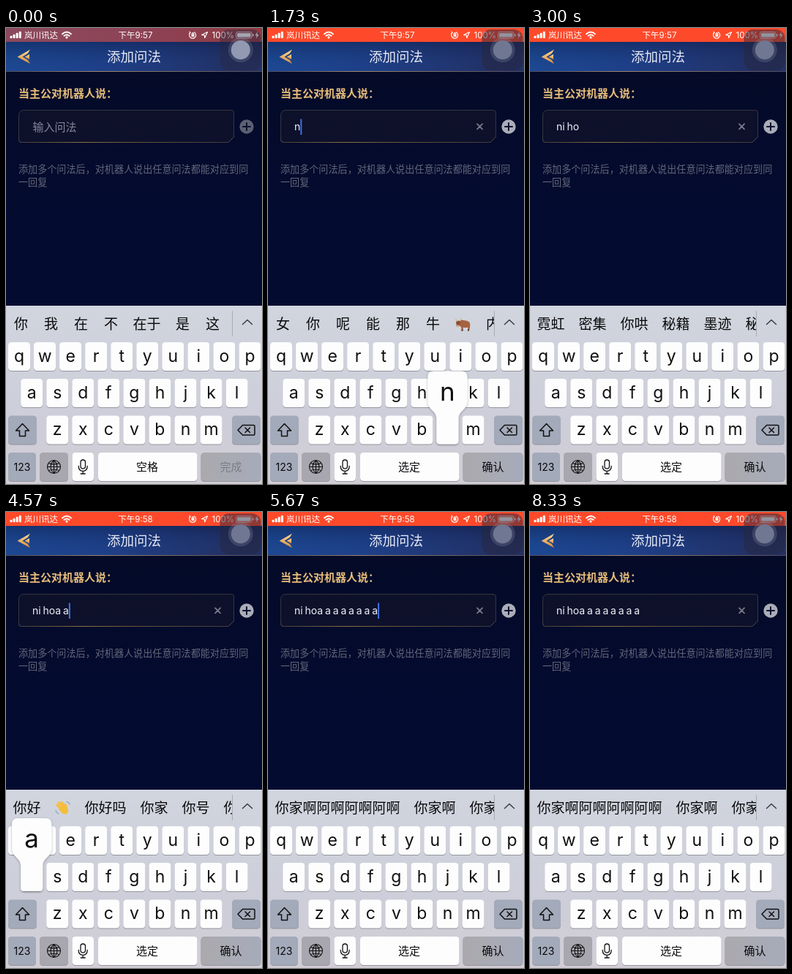
Write an HTML page that moves like this. It is 350x624 px and loops after 8.36 s.

```html
<!DOCTYPE html>
<html lang="zh-CN">
<head>
<meta charset="utf-8">
<title>添加问法</title>
<style>
html, body { margin: 0; width: 100%; height: 100%; overflow: hidden; background: #030b2c; }
svg { display: block; width: 100vw; height: 100vh; }
text { font-family: Inter, "Noto Sans CJK SC", "Noto Sans CJK", sans-serif; white-space: pre; }
.mid { text-anchor: middle; }
.letter { font-size: 23px; font-weight: 400; fill: #101010; }
.line { fill: none; stroke-linecap: round; stroke-linejoin: round; }
</style>
</head>
<body>
<svg id="stage" viewBox="0 0 350 624">
  <defs>
    <linearGradient id="nav" x2="1" y2=".15">
      <stop stop-color="#1a4a94"/><stop offset=".5" stop-color="#1d3d85"/><stop offset="1" stop-color="#222c5c"/>
    </linearGradient>
    <linearGradient id="navShade" x2="0" y2="1">
      <stop stop-color="#0a1740" stop-opacity=".4"/><stop offset="1" stop-color="#2a55a8" stop-opacity=".12"/>
    </linearGradient>
    <linearGradient id="rule">
      <stop stop-color="#4d4a5c"/><stop offset=".35" stop-color="#a08868"/><stop offset="1" stop-color="#4d4a5c"/>
    </linearGradient>
    <linearGradient id="page" x2="0" y2="1">
      <stop stop-color="#040a25"/><stop offset=".45" stop-color="#030b31"/><stop offset="1" stop-color="#030a2d"/>
    </linearGradient>
    <linearGradient id="gold" x2="0" y2="1">
      <stop stop-color="#ffdc96"/><stop offset="1" stop-color="#d78a3c"/>
    </linearGradient>
    <linearGradient id="edge" gradientUnits="userSpaceOnUse" x1="17" x2="311" y1="0" y2="0">
      <stop stop-color="#423d3d"/><stop offset=".3" stop-color="#8a6f44"/><stop offset=".55" stop-color="#66553c"/><stop offset="1" stop-color="#3e3b40"/>
    </linearGradient>
    <linearGradient id="board" x2="0" y2="1">
      <stop stop-color="#d1d5de"/><stop offset=".6" stop-color="#cdced9"/><stop offset="1" stop-color="#d2cdd5"/>
    </linearGradient>
    <linearGradient id="action">
      <stop stop-color="#aba9ad"/><stop offset="1" stop-color="#a6abba"/>
    </linearGradient>
    <clipPath id="candClip"><rect y="382" width="309" height="44"/></clipPath>
    <filter id="soft" x="-30%" y="-30%" width="160%" height="160%">
      <feDropShadow dx="0" dy="1" stdDeviation="1.4" flood-color="#333" flood-opacity=".4"/>
    </filter>
  </defs>

  <rect width="350" height="624" fill="url(#page)"/>

  <rect width="350" height="60" fill="url(#nav)"/>
  <rect y="19" width="350" height="41" fill="url(#navShade)"/>
  <rect y="59" width="350" height="1" fill="url(#rule)"/>
  <path d="M33 29.5L15.5 39.5L33 49L29.8 43.8L22.5 39.5L29.8 34.7Z" fill="url(#gold)"/>
  <path d="M25.5 39.5L32 36V43Z" fill="url(#gold)"/>
  <text class="mid" x="175" y="45.5" font-size="18.5" fill="#e6eaf5">添加问法</text>

  <rect id="bar" width="350" height="19" fill="#fe4a2b"/>
  <g id="status" fill="#fff"></g>

  <g>
    <rect id="assistBox" x="292.5" y="2" width="56" height="56" rx="12" fill="#26273f"/>
    <circle cx="320.8" cy="30" r="17" fill="#8890a8" opacity=".25"/>
    <circle cx="320.8" cy="30" r="13" id="assistDot"/>
  </g>

  <text x="17" y="94.5" font-size="15" font-weight="700" fill="#e6bc78">当主公对机器人说：</text>
  <path d="M25 112.5H308Q311.5 112.5 311.5 116V149L304 156.5H21Q17.5 156.5 17.5 153V120Q17.5 112.5 25 112.5Z"
    fill="#10122b" fill-opacity=".85" stroke="#37353f"/>
  <path class="line" d="M17.5 150V153Q17.5 156.5 21 156.5H304L311.5 149" stroke="url(#edge)"/>
  <text id="hint" x="36.5" y="140.5" font-size="15" fill="#83879a">输入问法</text>
  <text id="typed" x="36" y="140" font-size="14" fill="#eef0f8" word-spacing="-1.1"></text>
  <rect id="caret" y="124.5" width="2" height="21.5" fill="#416fe4"/>
  <path id="clear" class="line" d="M286 131.3L293 138.3M293 131.3L286 138.3" stroke="#777b89" stroke-width="1.8"/>
  <circle id="plus" cx="329" cy="135" r="9.7"/>
  <path class="line" d="M324 135H334M329 130V140" stroke="#0b1130" stroke-width="2"/>
  <g font-size="13.1" fill="#62677a">
    <text x="17" y="198">添加多个问法后，对机器人说出任意问法都能对应到同</text>
    <text x="17" y="216">一回复</text>
  </g>

  <rect y="380" width="350" height="244" fill="url(#board)"/>
  <g id="cands" clip-path="url(#candClip)" font-size="19" fill="#0a0a0c"></g>
  <path d="M309.5 387V422" stroke="#a9acb5"/>
  <path class="line" d="M323.5 405.5L330 399.5L336.5 405.5" stroke="#333840" stroke-width="1.4"/>
  <g id="keys"></g>
  <g id="pop" filter="url(#soft)">
    <path id="popShape" fill="#fdfdfe"/>
    <text id="popText" class="mid" font-size="35" font-weight="400" fill="#101010"></text>
  </g>
</svg>
<script>
const LOOP = 8360;
const $ = id => document.getElementById(id);
const show = (id, on) => $(id).setAttribute('visibility', on ? 'visible' : 'hidden');
const clamp = v => Math.max(0, Math.min(1, v));

// Keyboard
const PITCH = 35.05, KEY_W = 30, KEY_H = 39;
const spots = {};

function key(x, y, w, fill, body) {
  return `<rect x="${x}" y="${y + 1}" width="${w}" height="${KEY_H}" rx="4.5" fill="#92959d"/>
    <rect x="${x}" y="${y}" width="${w}" height="${KEY_H}" rx="4.5" fill="${fill}"/>${body}`;
}
function label(x, y, size, str, id = '') {
  return `<text class="mid" id="${id}" x="${x}" y="${y}" font-size="${size}" fill="#0a0a0c">${str}</text>`;
}
function icon(d, width = 1.5) {
  return `<path class="line" d="${d}" stroke="#111" stroke-width="${width}"/>`;
}
function buildKeys() {
  let out = '';
  [['qwertyuiop', 3, 430], ['asdfghjkl', 20.2, 480], ['zxcvbnm', 55.2, 530.5]].forEach(([row, x0, y]) => {
    [...row].forEach((c, i) => {
      const x = x0 + i * PITCH;
      spots[c] = { x, y };
      out += key(x, y, KEY_W, '#fdfdfe', `<text class="mid letter" x="${x + 15}" y="${y + 26.5}">${c}</text>`);
    });
  });
  const grey = '#a3aaba', warm = '#a8a7af', white = '#fdfdfe';
  out += key(3, 530.5, 39, grey, icon('M22.5 541.5L13.5 551H18.5V558.5H26.5V551H31.5Z'));
  out += key(309, 530.5, 39, grey, icon('M323.5 543.5H338.5Q340 543.5 340 545V555.5Q340 557 338.5 557H323.5L317 550.2ZM327 547L333.5 553.5M333.5 547L327 553.5'));
  out += key(3, 581, 38, grey, label(22, 606, 14, '123'));
  out += key(46, 581, 39, warm, icon('M56.5 600.5a9 9 0 1 0 18 0a9 9 0 1 0 -18 0M65.5 591.5V609.5M56.5 600.5H74.5M65.5 591.5q-9 9 0 18q9 -9 0 -18M58.5 595.5q7 3 14 0M58.5 605.5q7 -3 14 0', 1.1));
  out += key(90.5, 581, 29.5, white,
    '<rect x="102" y="591" width="6.5" height="12" rx="3.2" fill="none" stroke="#111" stroke-width="1.3"/>' +
    icon('M99.2 599.5q0 6.8 6 6.8t6 -6.8M105.2 606.3V610M102.2 610H108.2', 1.3));
  out += key(126, 581, 135.5, white, label(193, 606, 15, '', 'space'));
  out += key(266.5, 581, 82, 'url(#action)', label(307.5, 606, 15, '', 'done'));
  $('keys').innerHTML = out;
}

function buildStatus() {
  let out = '';
  for (let i = 0; i < 4; i++) {
    const h = 3.2 + i * 2;
    out += `<rect x="${5.5 + i * 4.1}" y="${14 - h}" width="3" height="${h}" rx=".7"/>`;
  }
  out += `<text x="25" y="14" font-size="11.5">岚川讯达</text>
    <g class="line" stroke="#fff" stroke-width="1.9">
      <path d="M77 8.2Q83 2.9 89 8.2M79.4 10.7Q83 7.6 86.6 10.7"/>
      <circle cx="83" cy="12.9" r=".6"/>
    </g>
    <text id="clock" class="mid" x="177" y="14" font-size="11.5"></text>
    <g class="line" stroke="#fff" stroke-width="1.1">
      <path d="M252 6.4a4.5 4.5 0 1 0 5.5 -.6M251 5L252.2 6.6L250.5 7.4M254.3 8.6V7.8a1.2 1.2 0 0 1 2.4 0V8.6"/>
      <path d="M267.5 9.5L275.5 5.5L271.8 13.6L271.2 9.9Z"/>
    </g>
    <rect x="253.5" y="8.5" width="4" height="3.3"/>
    <text x="281.5" y="13.8" font-size="11.5">100%</text>
    <rect x="314.5" y="5.5" width="21.5" height="8.5" rx="2" fill="none" stroke="#fff" stroke-opacity=".8"/>
    <rect x="316" y="7" width="18.5" height="5.5" rx="1"/>
    <rect x="337" y="8" width="1.5" height="3.5" rx=".7"/>
    <path d="M344 5L340.5 10.2H342.8L341.8 14.4L345.8 8.9H343.3Z"/>`;
  $('status').innerHTML = out;
}

// Small pictograms, drawn in a 22 px cell
const pictures = {
  ox: `<path d="M5 7Q8 4.5 12 6Q17 6 20 8.5Q21.5 12 20.5 16L19.5 20H17.5L17.8 15.5Q14 16.5 11.5 15.5L11 20H9L8.5 15Q6 14 5.5 12Z" fill="#a5633f"/>
    <path d="M1.5 8L4.5 6.5L8 8L6.5 12.5L4.5 15H2.5L2 12Z" fill="#8c4f30"/>
    <path d="M2.2 12.5H6L4.6 15.2H2.4Z" fill="#d9a68a"/>
    <path class="line" d="M3 6.8Q1 6 1.5 3.8M6.5 6.8Q8.5 6 8 3.8" stroke="#cdbb98" stroke-width="1.2"/>
    <path d="M9 18.8H11.1V20.4H8.8ZM17.5 18.8H19.8L19.4 20.4H17.4Z" fill="#40302a"/>`,
  wave: `<g class="line" stroke="#f5bd3c" stroke-width="3.2">
    <path d="M10 13L3.5 7M12 11L6 3.8M14 10L10 3.5M16 11L14.5 6.5L16 13"/></g>
    <path d="M8 11L15 7.5Q19 11 18.5 16Q17 20 13 19.5Q9 18 5 12.5Z" fill="#f5bd3c"/>
    <path class="line" d="M1.5 14Q2 17.5 5.5 19M16.5 2.5Q19.5 3 20.5 6" stroke="#7fa3c8" stroke-width="1.1"/>`
};

function drawCands(list) {
  let x = 9.5, out = '';
  for (const word of list) {
    const pic = pictures[word];
    const w = pic ? 22 : Math.max(22, 19 * word.length);
    out += pic ? `<g transform="translate(${x} 394)">${pic}</g>`
      : `<text class="mid" x="${x + w / 2}" y="412">${word}</text>`;
    x += w + 19;
  }
  $('cands').innerHTML = out;
}

// Typing: press times, then the words offered after each press
const presses = [[1650, 'n'], [1830, 'i'], [2000, 'h'], [2160, 'o'],
  ...[4370, 4520, 4690, 4850, 4975, 5130, 5330, 5540].map(t => [t, 'a'])];
const POP = 125, TEXT_LAG = 30, CAND_LAG = 70;
const offers = ['你 我 在 不 在于 是 这', '女 你 呢 能 那 牛 ox 内', '你 呢 尼 泥 拟 逆 妮 腻',
  '你好 你会 你还 你和 你很 你', '霓虹 密集 你哄 秘籍 墨迹 秘籍', '你好 wave 你好吗 你家 你号 你好'];

function offer(n) {
  // The first doubled vowel still offers the same words.
  if (n < 7) return offers[Math.min(n, 5)].split(' ');
  return ['你家' + '啊阿啊阿啊阿啊'.slice(0, n - 5), '你家啊', '你家', '你好', '你号', '你'];
}
function spell(n) {
  const base = ['', 'n', 'ni', 'ni h', 'ni ho'];
  return n < 5 ? base[n] : 'ni hoa' + ' a'.repeat(n - 5);
}
const countAt = t => presses.filter(p => p[0] <= t).length;

// Caret: [start, target opacity, duration]
const OUT = 230, IN = 130;
const blinks = [[0, 0, 1], [100, 1, IN], [600, 0, OUT], [1100, 1, IN], [1600, 0, OUT], [1680, 1, 1],
  [2770, 0, OUT], [3270, 1, IN], [3770, 0, OUT], [4270, 1, IN], [6130, 0, OUT], [6630, 1, IN],
  [7130, 0, OUT], [7630, 1, IN], [8130, 0, 200]];

function caretAlpha(t) {
  const [start, to, dur] = blinks.filter(b => b[0] <= t).pop();
  const k = start ? clamp((t - start) / dur) : 1;
  return to ? k : 1 - k;
}

function drawPop(t) {
  const hit = presses.find(p => t >= p[0] && t < p[0] + POP);
  show('pop', hit);
  if (!hit) return;
  const { x, y } = spots[hit[1]];
  $('popShape').setAttribute('d', `M${x - 4} ${y - 61}h38q8 0 8 8v33c0 13 -12 12 -12 25
    v${KEY_H - 9.5}q0 4.5 -4.5 4.5h-21q-4.5 0 -4.5 -4.5v${9.5 - KEY_H}c0 -13 -12 -12 -12 -25v-33q0 -8 8 -8z`);
  $('popText').setAttribute('x', x + 15);
  $('popText').setAttribute('y', y - 21);
  $('popText').textContent = hit[1];
}

const mix = (a, b, k) => `rgb(${a.map((v, i) => Math.round(v + (b[i] - v) * k))})`;
let shownText = -1, shownCands = -1;

function render(t) {
  const k = clamp((t - 30) / 200);
  $('bar').setAttribute('opacity', .5 + .5 * k);
  $('assistBox').setAttribute('opacity', .42 + .08 * k);
  $('assistDot').setAttribute('fill', mix([146, 154, 178], [112, 119, 146], k));
  $('clock').textContent = t < 4300 ? '下午9:57' : '下午9:58';

  const n = countAt(t - TEXT_LAG), filled = n > 0;
  if (n !== shownText) {
    shownText = n;
    $('typed').textContent = spell(n);
    $('caret').setAttribute('x', 36 + (filled ? $('typed').getComputedTextLength() : 0));
    show('hint', !filled);
    show('clear', filled);
    $('plus').setAttribute('fill', filled ? '#aaadb8' : '#5b6072');
    $('space').textContent = filled ? '选定' : '空格';
    $('done').textContent = filled ? '确认' : '完成';
    $('done').setAttribute('fill', filled ? '#0a0a0c' : '#7b7e86');
  }
  const c = countAt(t - CAND_LAG);
  if (c !== shownCands) drawCands(offer(shownCands = c));
  $('caret').setAttribute('opacity', caretAlpha(t));
  drawPop(t);
}

buildStatus();
buildKeys();
const begin = performance.now();
function tick() {
  render((performance.now() - begin) % LOOP);
  requestAnimationFrame(tick);
}
tick();
</script>
</body>
</html>
```
